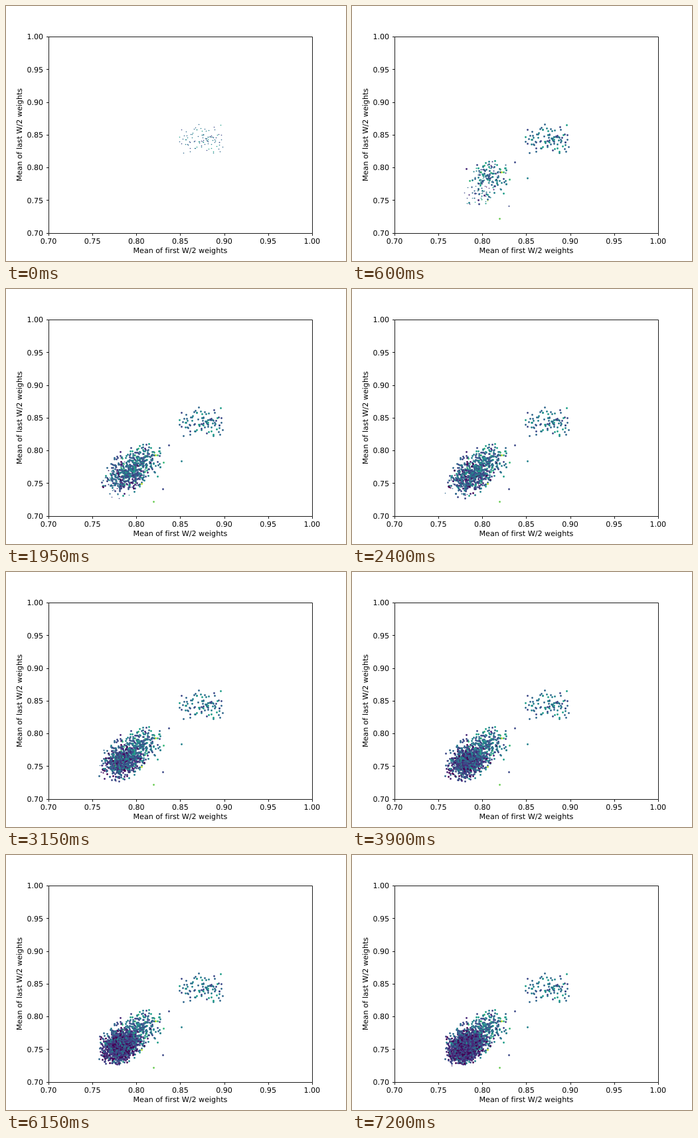
Recreate the animation shown at these times as an HTML page with a canvas. Size 512x384 px, loop 7.35 s.

```html
<!DOCTYPE html>
<html lang="en">
<head>
<meta charset="utf-8">
<title>Mean weights scatter</title>
<style>
  html, body { margin: 0; width: 100%; height: 100%; overflow: hidden; background: #fff; }
  svg, canvas { position: absolute; left: 0; top: 0; }
  text {
    font: 11.11px "DejaVu Sans", sans-serif;
    font-variant-ligatures: none;
    text-rendering: geometricPrecision;
    text-anchor: middle;
  }
  .y { text-anchor: end; }
  path { fill: none; stroke: #000; stroke-width: 0.89; }
</style>
</head>
<body>
<svg id="axes" width="512" height="384">
  <text x="262.4" y="372">Mean of first W/2 weights</text>
  <text transform="translate(24 194) rotate(-90)">Mean of last W/2 weights</text>
</svg>
<canvas id="plot" width="512" height="384"></canvas>
<script>
const STEP = 150, STEPS = 49, START = 95, PER_STEP = 50;
const viridis = ['#440154', '#482878', '#3e4a89', '#31688e', '#26828e',
  '#1f9e89', '#35b779', '#6ece58', '#b5de2b', '#fde725'];

// Axes: frame, ticks and tick labels
let marks = 'M64.5 46.5H461.5V342.5H64.5Z', labels = '';
for (let i = 0; i < 7; i++) {
  const x = 64 + 66.13 * i, y = 341.76 - 49.28 * i, value = (0.7 + 0.05 * i).toFixed(2);
  marks += `M${Math.round(x) + 0.5} 342.5v3.5M64.5 ${Math.round(y) + 0.5}h-3.5`;
  labels += `<text x="${x}" y="358.4">${value}</text><text class="y" x="56.2" y="${y + 4.2}">${value}</text>`;
}
axes.innerHTML += `<path d="${marks}"/>` + labels;

let seed = 7;
function random() {
  seed = (seed * 1664525 + 1013904223) % 4294967296;
  return (seed + 0.5) / 4294967296;
}
function normal(limit = 2.7) {
  let n;
  do n = Math.sqrt(-2 * Math.log(random())) * Math.cos(2 * Math.PI * random());
  while (Math.abs(n) > limit);
  return n;
}
const shade = (mean, low = 0, high = 9) =>
  Math.max(low, Math.min(high, Math.round(mean + 1.25 * normal(4))));

const points = [];
const add = (x, y, step, color) =>
  points.push({ x: Math.round(x) + 0.5, y: Math.round(y) + 0.5, step, color: viridis[color] });

// Starting population
for (let i = 0; i < START; i++)
  add(294 + 16 * normal(2.1), 201 + 11 * normal(2.1), 0, shade(3.3, 2, 5));

// Each generation drifts down and left, tightens and darkens
for (let k = 1; k < STEPS; k++) {
  const jump = Math.exp(-((k / 6) ** 1.5)), drift = Math.exp(-k / 15);
  for (let i = 0; i < PER_STEP; i++) {
    const dx = (9.5 + 9 * drift - 4 * jump) * normal();
    const dy = (9 + 6 * drift) * normal() - 0.2 * dx;
    const color = random() < 0.015 * jump ? 8 : shade(1 + 2.7 * Math.exp(-k / 22), 0, 6);
    add(168 + 10 * drift + 34 * jump + dx, 291 - 15 * drift - 18 * jump + dy, k, color);
  }
}

// Far stragglers
add(222, 320, 2, 7);
add(264, 259, 1, 4);
add(236, 301, 3, 2);
points.sort((a, b) => a.step - b.step);

const ctx = plot.getContext('2d');
let shown = -1;
function frame(now) {
  const step = Math.floor(now / STEP) % STEPS;
  if (step !== shown) {
    shown = step;
    ctx.clearRect(0, 0, 512, 384);
    for (const p of points) {
      if (p.step > step) break;
      const radius = Math.min(1.4, 0.8 + 0.3 * (step - p.step));  // dots thicken with age
      ctx.fillStyle = p.color;
      ctx.beginPath();
      ctx.arc(p.x, p.y, radius, 0, 7);
      ctx.fill();
    }
  }
  requestAnimationFrame(frame);
}
frame(performance.now());
</script>
</body>
</html>
```
